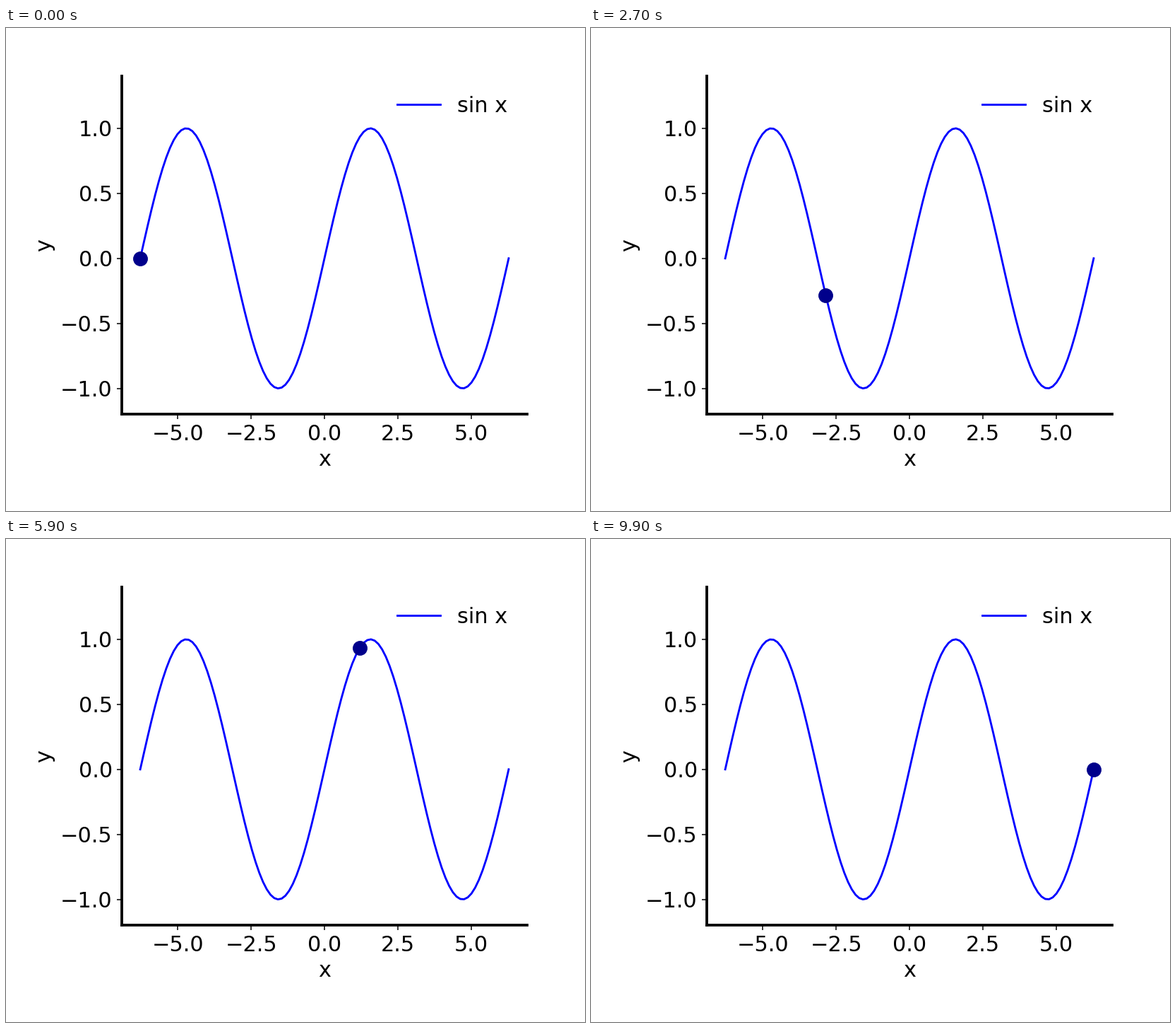
These frames come from a looping animation (820x683 px, 10000 ms). A matplotlib script:

```python
import numpy as np
import matplotlib.pyplot as plt
from matplotlib.animation import FuncAnimation

WIDTH, HEIGHT = 820, 683
DPI = WIDTH / 6
STEPS = 100
INTERVAL = 100  # ms

plt.rcParams.update({"font.family": "DejaVu Sans", "font.size": 16})

x = np.linspace(-2 * np.pi, 2 * np.pi, STEPS)
y = np.sin(x)

# The tiny surplus keeps the pixel size from being floored.
fig, ax = plt.subplots(
    figsize=((WIDTH + 1e-6) / DPI, (HEIGHT + 1e-6) / DPI), dpi=DPI, facecolor="white"
)
fig.subplots_adjust(left=0.2, right=0.9, bottom=0.2, top=0.9)

ax.plot(x, y, color="blue", lw=1.5, label="sin x")
dot, = ax.plot(x[:1], y[:1], "o", color="darkblue", ms=10)

ax.set_ylim(-1.2, 1.4)
ax.set_xticks(np.arange(-5, 5.1, 2.5))
ax.set_yticks(np.arange(-1, 1.1, 0.5))
ax.set_xlabel("x")
ax.set_ylabel("y")
ax.legend(loc="upper right", frameon=False)

ax.spines[["top", "right"]].set_visible(False)
ax.spines[["left", "bottom"]].set_linewidth(2)


def update(i):
    dot.set_data(x[i:i + 1], y[i:i + 1])
    return dot,


anim = FuncAnimation(fig, update, frames=STEPS, interval=INTERVAL, repeat=True)
plt.show()
```
